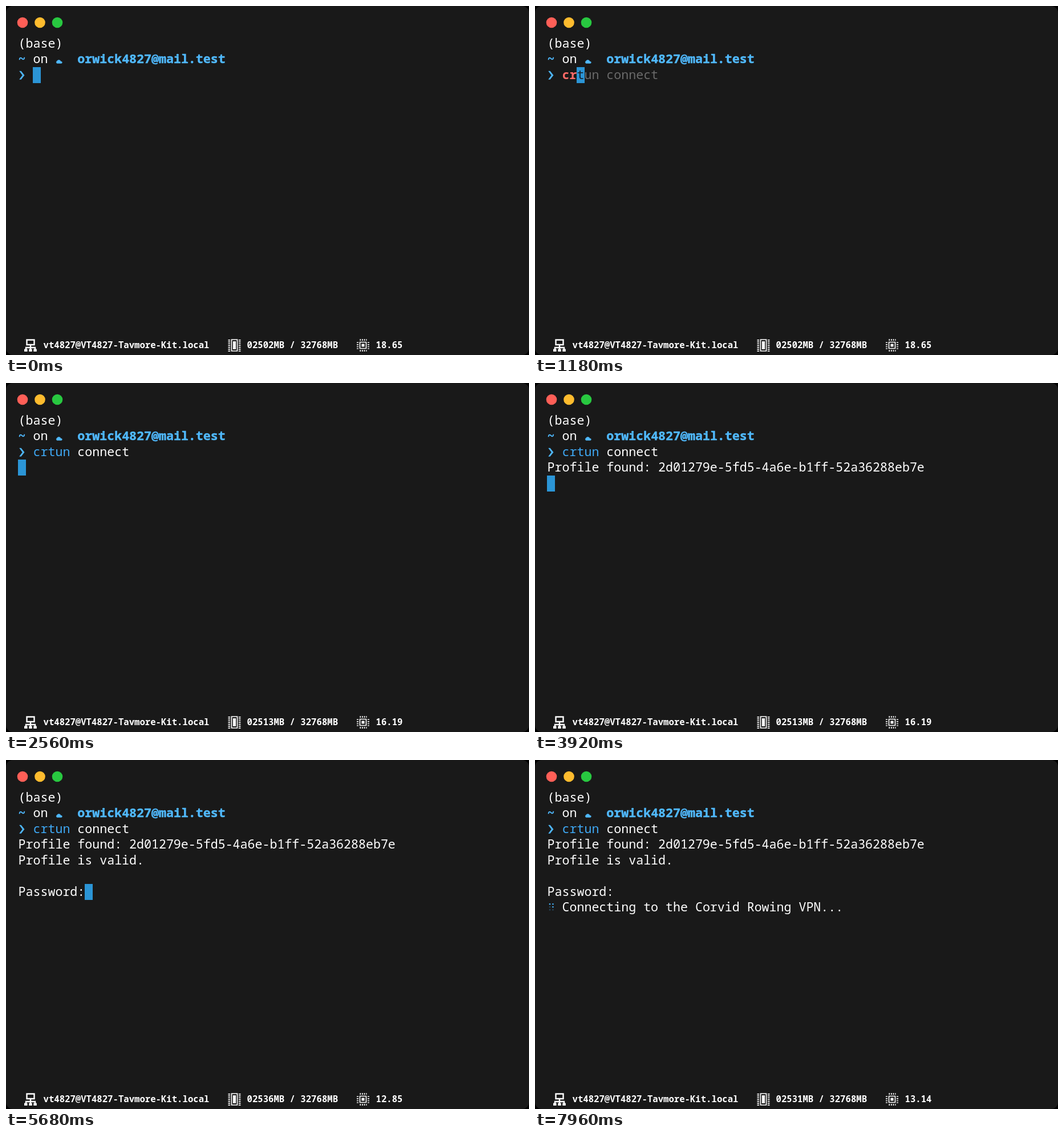
An HTML page that plays this animation: 917x611 px, repeating every 8 s.

```html
<!DOCTYPE html>
<html lang="en">
<head>
<meta charset="utf-8">
<title>Terminal session</title>
<style>
  html, body { margin: 0; width: 100%; height: 100%; overflow: hidden; background: #000; }
  svg { display: block; width: 917px; height: 611px; }
  text { font: 500 21.62px "Noto Sans Mono", "DejaVu Sans Mono", monospace; fill: #fff;
         white-space: pre; font-variant-ligatures: none; }
  .sky, .sky text { fill: #50b9fd; font-weight: 700; stroke: #50b9fd; stroke-width: .4; }
  .command { fill: #3fa9f5; }
  .command.partial { fill: #ff6b68; font-weight: 700; }
  .hint { fill: #6a6a6a; }
  .under { fill: #16222b; }
  .bar text { font-size: 15.65px; font-weight: 700; }
  .icon { fill: none; stroke: #fff; stroke-width: 2; }
</style>
</head>
<body>
<svg viewBox="0 0 917 611">
  <rect width="917" height="611" rx="12" fill="#191919"/>
  <circle cx="29" cy="29" r="9.3" fill="#ff5f57"/>
  <circle cx="59.5" cy="29" r="9.3" fill="#febc2e"/>
  <circle cx="90" cy="29" r="9.3" fill="#28c840"/>

  <g id="screen">
    <rect id="cursor" width="14" height="28" fill="#2b95d6"/>
    <g class="sky">
      <path d="M89.5 100.500a2.600 2.600 0 0 1 .2-4.600a3.700 3.700 0 0 1 6.500 1.300a1.700 1.700 0 0 1 1 3.300z"/>
      <path d="M23.600 114h2.900l5.700 7.200l-5.700 7.300h-2.900l5.300-7.300z"/>
    </g>
  </g>
  <g id="spinner" fill="#45b0f5"></g>

  <g class="bar">
    <g class="icon">
      <path d="M36.500 584.500h13v8.500h-13zM43 593v8M35 602v-4h16v4" stroke-width="2.400"/>
      <path d="M32 602.700h5.500M40.300 602.700h5.400M48.300 602.700h5.500" stroke-width="4.600"/>
      <path d="M395.500 584h10v20h-10z" stroke-width="1.700"/>
      <path d="M400.500 587v14" stroke-width="5"/>
      <path d="M391.300 584v21M409.700 584v21" stroke-width="3.600" stroke-dasharray="1.700 1.500"/>
      <path d="M620.500 588.500h11v11h-11z" stroke-width="1.700"/>
      <path d="M623.500 594h5" stroke-width="5"/>
      <path d="M616.500 588.500v12M635.500 588.500v12M620.500 584.500h12M620.500 603.500h12"
            stroke-width="3" stroke-dasharray="1.600 2"/>
    </g>
    <text x="65.500" y="598.700">vt4827@VT4827-Tavmore-Kit.local</text>
    <text id="memory" x="422.500" y="598.700"></text>
    <text id="cpu" x="648.500" y="598.700"></text>
  </g>
</svg>
<script>
const LOOP = 8000, COL = 12.97, ROW = 27.55, LEFT = 21.3, TOP = 51.8;
const COMMAND = 'crtun connect', NAME_LEN = 5;
const KEYS = [1020, 1160, 1340, 1420, 1500, 1580, 1660, 1740, 1920, 2000, 2080, 2160, 2240];
const ENTER = 2500, FOUND = 3140, VALID = 3940, ASK = 4200, SENT = 7340, CONNECT = 7720;
const STATUS = [[0, '02502', '18.65'], [ENTER, '02513', '16.19'],
                [5600, '02536', '12.85'], [CONNECT, '02531', '13.14']];
const SPIN = '⠋⠙⠹⠸⠼⠴⠦⠧⠇⠏', SPIN_MS = 130;

const $ = id => document.getElementById(id);
const screen = $('screen'), cursor = $('cursor');

function make(parent, tag, attrs) {
  const el = document.createElementNS('http://www.w3.org/2000/svg', tag);
  for (const key in attrs) el.setAttribute(key, attrs[key]);
  return parent.appendChild(el);
}

function put(col, row, text = '', cls = '') {
  const el = make(screen, 'text', { x: LEFT + col * COL + 0.3, y: 72.6 + row * ROW, class: cls });
  el.textContent = text;
  return el;
}

function setText(el, text) {
  if (el.textContent !== text) el.textContent = text;
}

function show(el, on) {
  el.style.visibility = on ? 'visible' : 'hidden';
}

put(0, 0, '(base)');
put(0, 1, '~', 'sky');
put(2, 1, 'on');
put(8, 1, 'orwick4827@mail.test', 'sky');
const command = put(2, 2), args = put(2 + NAME_LEN, 2);
const hint = put(0, 2, '', 'hint'), under = put(0, 2, '', 'under');

const lines = [
  [FOUND, put(0, 3, 'Profile found: 2d01279e-5fd5-4a6e-b1ff-52a36288eb7e')],
  [VALID, put(0, 4, 'Profile is valid.')],
  [ASK, put(0, 6, 'Password:')],
  [CONNECT, put(2, 7, 'Connecting to the Corvid Rowing VPN...')]
];
const dots = Array.from({ length: 6 }, (_, i) => make($('spinner'), 'circle', {
  cx: 26 + 5.4 * Math.floor(i / 3), cy: 252.3 + 5 * (i % 3), r: 1.3
}));

function cursorCell(t, typed) {
  if (t < ENTER) return [2 + typed, 2];
  if (t < FOUND) return [0, 3];
  if (t < VALID) return [0, 4];
  if (t < ASK) return [0, 5];
  if (t < SENT) return [9, 6];
  return [0, 7];
}

function draw(t) {
  const typed = KEYS.filter(k => k <= t).length;
  setText(command, COMMAND.slice(0, Math.min(typed, NAME_LEN)));
  command.setAttribute('class', typed < NAME_LEN ? 'command partial' : 'command');
  setText(args, COMMAND.slice(NAME_LEN, Math.max(typed, NAME_LEN)));

  // Autosuggestion: the letter below the cursor is dark, the rest grey.
  const x = LEFT + (2 + typed) * COL + 0.3;
  under.setAttribute('x', x);
  hint.setAttribute('x', x + COL);
  setText(under, typed ? COMMAND.slice(typed, typed + 1) : '');
  setText(hint, typed ? COMMAND.slice(typed + 1) : '');

  const [col, row] = cursorCell(t, typed);
  cursor.setAttribute('x', Math.round(LEFT + col * COL));
  cursor.setAttribute('y', Math.round(TOP + row * ROW));
  show(cursor, t < CONNECT);

  for (const [start, el] of lines) show(el, t >= start);

  const spinning = t >= CONNECT;
  show($('spinner'), spinning);
  if (spinning) {
    const bits = SPIN.charCodeAt(Math.floor((t - CONNECT) / SPIN_MS) % SPIN.length);
    dots.forEach((dot, i) => dot.setAttribute('opacity', bits >> i & 1 ? 1 : 0.3));
  }

  const [, used, load] = STATUS.filter(s => s[0] <= t).pop();
  setText($('memory'), used + 'MB / 32768MB');
  setText($('cpu'), load);
}

const began = performance.now();
function tick() {
  draw((performance.now() - began) % LOOP);
  requestAnimationFrame(tick);
}
tick();
</script>
</body>
</html>
```
